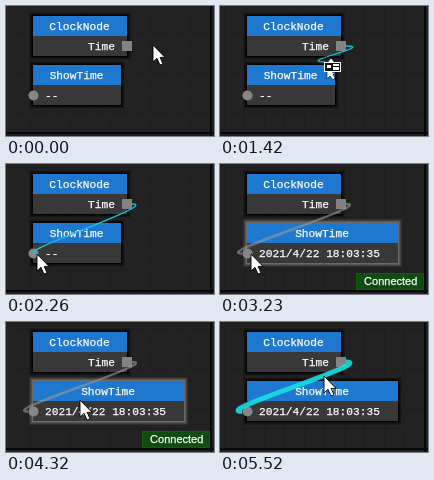
Write an HTML page that moves like this. It is 208 px wide and 130 px high and loops after 5720 ms.

```html
<!DOCTYPE html>
<html lang="en">
<head>
<meta charset="utf-8">
<title>Node editor</title>
<style>
  html, body { margin: 0; width: 100%; height: 100%; overflow: hidden; background: #222; }
  svg { display: block; width: 100vw; height: 100vh; }
  text { fill: #fff; stroke: #fff; stroke-width: .25; font: 11.2px "Liberation Mono", monospace; }
  .mid { text-anchor: middle; }
  .wire { fill: none; stroke-linecap: butt; }
</style>
</head>
<body>
<svg id="stage" viewBox="0 0 208 130"></svg>
<script>
const LOOP = 5720;
const stage = document.getElementById('stage');

function add(tag, attrs, parent = stage) {
  const el = document.createElementNS('http://www.w3.org/2000/svg', tag);
  set(el, attrs);
  parent.append(el);
  return el;
}
function set(el, attrs) {
  for (const k in attrs) el.setAttribute(k, attrs[k]);
}
const show = (el, on) => set(el, { visibility: on ? 'visible' : 'hidden' });
const box = (x, y, width, height, fill, parent) => add('rect', { x, y, width, height, fill }, parent);
function label(x, y, str, parent, cls = '') {
  const el = add('text', { x, y, class: cls }, parent);
  el.textContent = str;
  return el;
}

// Background grid
box(0, 0, 208, 130, '#222');
for (let x = 4; x < 208; x += 20) box(x, 0, 1, 130, '#1e1e1e');
for (let y = 6; y < 130; y += 20) box(0, y, 208, 1, '#1e1e1e');
box(204, 0, 2, 130, '#080808');
box(0, 126, 208, 2, '#080808');

const SHADOW = [.95, .65, .35, .15];
const GLOW = [.6, .42, .25, .1];

function makeNode(x, y, title) {
  const g = add('g', {});
  const rings = [1, 2, 3, 4].map(d => add('rect', { x: x - d + .5, y: y - d + .5, fill: 'none' }, g));
  const body = box(x, y + 20, 0, 20, '#383838', g);
  const head = box(x, y, 0, 20, '#1f78cf', g);
  const text = label(0, y + 14, title, g, 'mid');
  return (w, hover) => {
    rings.forEach((el, i) => set(el, {
      width: w + 2 * i + 1, height: 41 + 2 * i,
      stroke: hover ? '#999' : '#000',
      'stroke-opacity': (hover ? GLOW : SHADOW)[i]
    }));
    set(body, { width: w });
    set(head, { width: w });
    set(text, { x: x + w / 2 - .5 });
  };
}

const clock = makeNode(27, 10, 'ClockNode');
label(82, 44, 'Time');
box(116, 35, 10, 10, '#828282');

const viewer = makeNode(27, 59, 'ShowTime');
add('circle', { cx: 27.5, cy: 89.5, r: 5, fill: '#868686' });
const value = label(39, 93, '--');

const wire = add('path', { class: 'wire' });

const alertBox = add('g', {});
add('rect', { x: 136.5, y: 109.5, width: 67, height: 16, fill: '#104b10', stroke: '#0c5e0c' }, alertBox);
const alertText = label(170.7, 121, 'Connected', alertBox, 'mid');
alertText.style.font = '11px "Liberation Sans", sans-serif';

const arrow = add('path', {
  d: 'M0 0V17L4 13.3L7 20L10 18.8L7.1 12.4H12Z',
  fill: '#fff', stroke: '#000', 'stroke-width': .9
});

// Pointer used while dragging a wire
const dragger = add('g', {});
add('path', { d: 'M6 -4L10 1H2Z M2 7V17L5 14L8 18L10 16L8 12H11Z', fill: '#fff', stroke: '#000', 'stroke-width': .6 }, dragger);
box(-1, 0, 17, 10, '#fff', dragger);
box(0, 1, 15, 8, '#111', dragger);
box(2, 3, 4, 3, '#fff', dragger);
box(8, 2, 6, 2, '#fff', dragger);
box(8, 5, 6, 3, '#fff', dragger);

// Pointer stops: time, x, y
const stops = [
  [0, 147, 39], [20, 142, 38], [630, 133, 38], [830, 130, 39],
  [1030, 125, 43], [1420, 105, 56], [1450, 80, 74], [1650, 50, 86],
  [1860, 40, 88], [2060, 31, 90], [4320, 74, 78], [4520, 84, 71],
  [4720, 93, 64], [4920, 98, 60], [5120, 101, 57], [5320, 103, 55], [5520, 104, 54]
];

function curve(x, y) {
  const pull = Math.max(30, Math.abs(126 - x) * .3);
  return `M126 40C${126 + pull} 40 ${x - pull} ${y} ${x} ${y}`;
}

function draw(t) {
  const [, x, y] = stops.findLast(s => s[0] <= t);
  const joined = t >= 3230;
  const hot = t >= 5120;
  const dragging = t >= 1030 && t < 1860;

  clock(94, false);
  viewer(joined ? 151 : 88, joined && !hot);
  value.textContent = joined ? '2021/4/22 18:03:35' : '--';

  show(wire, t >= 1030);
  set(wire, {
    d: joined ? curve(22, 89.5) : curve(x, y),
    stroke: hot ? '#14dfe8' : joined ? '#999' : '#18c4dc',
    'stroke-width': hot ? 5 : joined ? 2.4 : 1.3,
    'stroke-opacity': hot ? .9 : joined ? .6 : 1
  });

  const fade = t < 4520 ? 1 : 1 - (Math.floor((t - 4520) / 200) + 1) * .25;
  show(alertBox, joined && fade > 0);
  set(alertBox, { opacity: Math.max(0, fade) });

  const at = { transform: `translate(${x} ${y})` };
  set(arrow, at);
  set(dragger, at);
  show(arrow, !dragging);
  show(dragger, dragging);
}

const start = performance.now();
function tick() {
  draw((performance.now() - start) % LOOP);
  requestAnimationFrame(tick);
}
tick();
</script>
</body>
</html>
```
